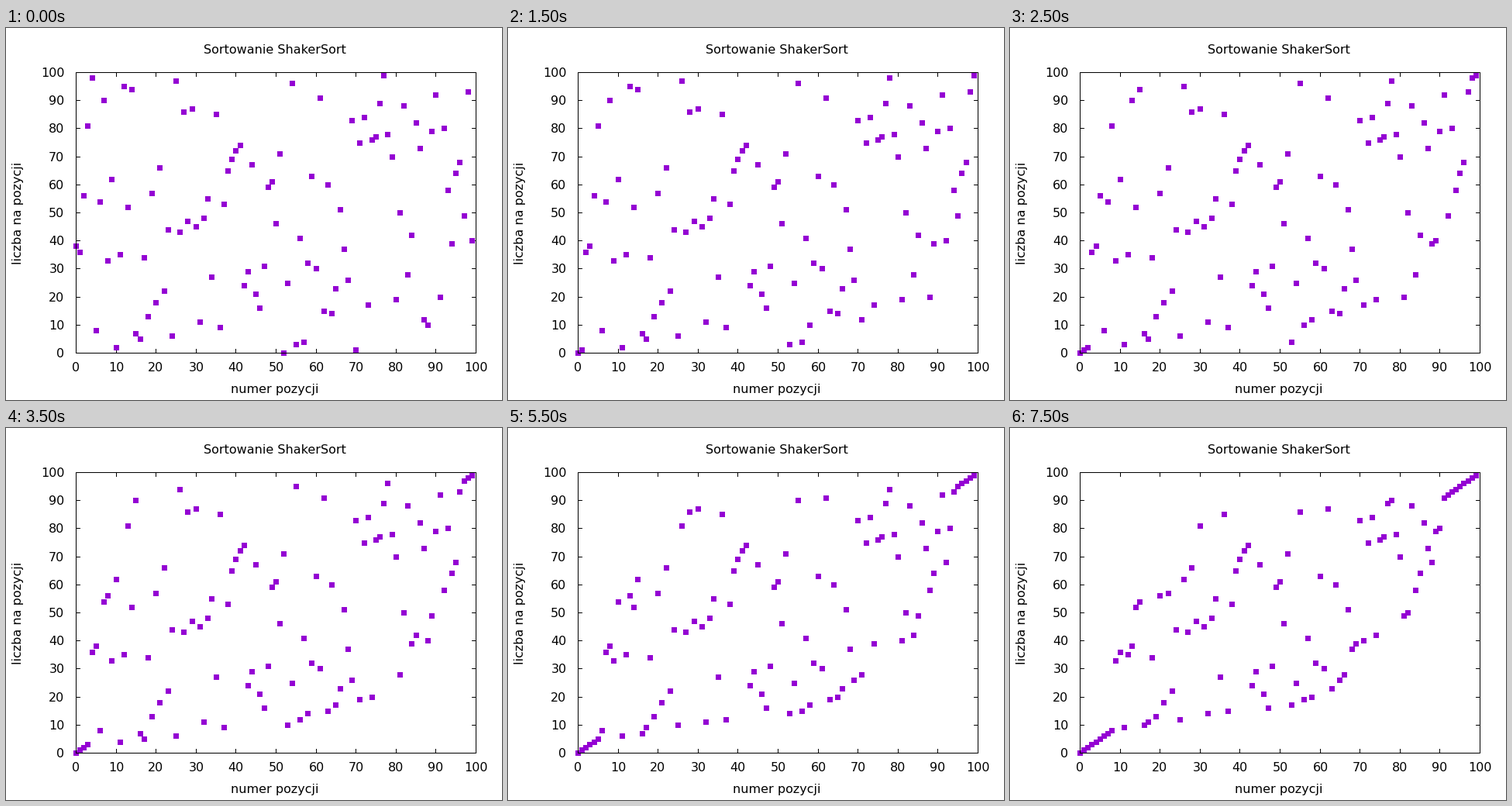
These frames come from a looping animation (640 px wide and 480 px high, 8000 ms). A matplotlib script:

```python
import numpy as np
import matplotlib.pyplot as plt
from matplotlib.animation import FuncAnimation
from matplotlib.collections import PolyCollection

W, H, DPI = 640, 480, 100
LEFT, RIGHT, TOP, BOTTOM = 90, 606, 57, 419
PURPLE = "#9400d3"
FRAMES, INTERVAL = 16, 500
MARK, TICK = 7, 5

START = [
    38, 36, 56, 81, 98, 8, 54, 90, 33, 62, 2, 35, 95, 52, 94, 7, 5, 34, 13, 57,
    18, 66, 22, 44, 6, 97, 43, 86, 47, 87, 45, 11, 48, 55, 27, 85, 9, 53, 65, 69,
    72, 74, 24, 29, 67, 21, 16, 31, 59, 61, 46, 71, 0, 25, 96, 3, 41, 4, 32, 63,
    30, 91, 15, 60, 14, 23, 51, 37, 26, 83, 1, 75, 84, 17, 76, 77, 89, 99, 78, 70,
    19, 50, 88, 28, 42, 82, 73, 12, 10, 79, 92, 20, 80, 58, 39, 64, 68, 49, 93, 40,
]


def px(x):
    return int(np.floor(LEFT + 0.5 + x * (RIGHT - LEFT) / 100))


def py(y):
    return int(np.floor(BOTTOM + 0.5 - y * (BOTTOM - TOP) / 100))


def box(x, y, w, h):
    return [(x, y), (x + w, y), (x + w, y + h), (x, y + h)]


def shaker_states(values, count):
    """State after each half pass: downward first, then upward, and so on."""
    a = list(values)
    states = [a[:]]
    for step in range(count - 1):
        order = range(len(a) - 1)
        for i in (reversed(order) if step % 2 == 0 else order):
            if a[i] > a[i + 1]:
                a[i], a[i + 1] = a[i + 1], a[i]
        states.append(a[:])
    return states


def squares(values):
    r = MARK // 2
    return [box(px(i) - r, py(v) - r, MARK, MARK) for i, v in enumerate(values)]


def add_boxes(boxes, color, z):
    group = PolyCollection(boxes, facecolors=color, linewidths=0,
                           antialiaseds=False, zorder=z)
    ax.add_collection(group, autolim=False)
    return group


def label(x, y, text, ha="center", **kw):
    ax.text(x, y, text, ha=ha, va=kw.pop("va", "baseline"), color="black",
            family="DejaVu Sans", size=16 * 72 / DPI, **kw)


fig = plt.figure(figsize=(W / DPI, H / DPI), dpi=DPI, facecolor="white")
ax = fig.add_axes([0, 0, 1, 1])
ax.set_xlim(0, W)
ax.set_ylim(H, 0)
ax.axis("off")

ticks = []
for n in range(0, 101, 10):
    x, y = px(n), py(n)
    ticks += [box(x, TOP, 1, TICK + 1), box(x, BOTTOM - TICK, 1, TICK + 1),
              box(LEFT, y, TICK + 1, 1), box(RIGHT - TICK, y, TICK + 1, 1)]
    label(x + 0.5, 443, str(n))
    label(75.5, y + 6, str(n), ha="right")
add_boxes(ticks, "black", 1)

wide, tall = RIGHT - LEFT + 1, BOTTOM - TOP + 1
add_boxes([box(LEFT, TOP, wide, 1), box(LEFT, BOTTOM, wide, 1),
           box(LEFT, TOP, 1, tall), box(RIGHT, TOP, 1, tall)], "black", 3)

label(346.5, 33, "Sortowanie ShakerSort")
label(347, 471, "numer pozycji")
label(20, 238.5, "liczba na pozycji", va="center", rotation=90,
      rotation_mode="default") if False else ax.text(
    20, 238.5, "liczba na pozycji", rotation=90, rotation_mode="anchor",
    ha="center", va="baseline", color="black", family="DejaVu Sans",
    size=16 * 72 / DPI)

states = shaker_states(START, FRAMES)
points = add_boxes(squares(states[0]), PURPLE, 2)


def update(frame):
    points.set_verts(squares(states[frame]))
    return [points]


anim = FuncAnimation(fig, update, frames=FRAMES, interval=INTERVAL,
                     repeat=True, repeat_delay=0, blit=False)
plt.show()
```
